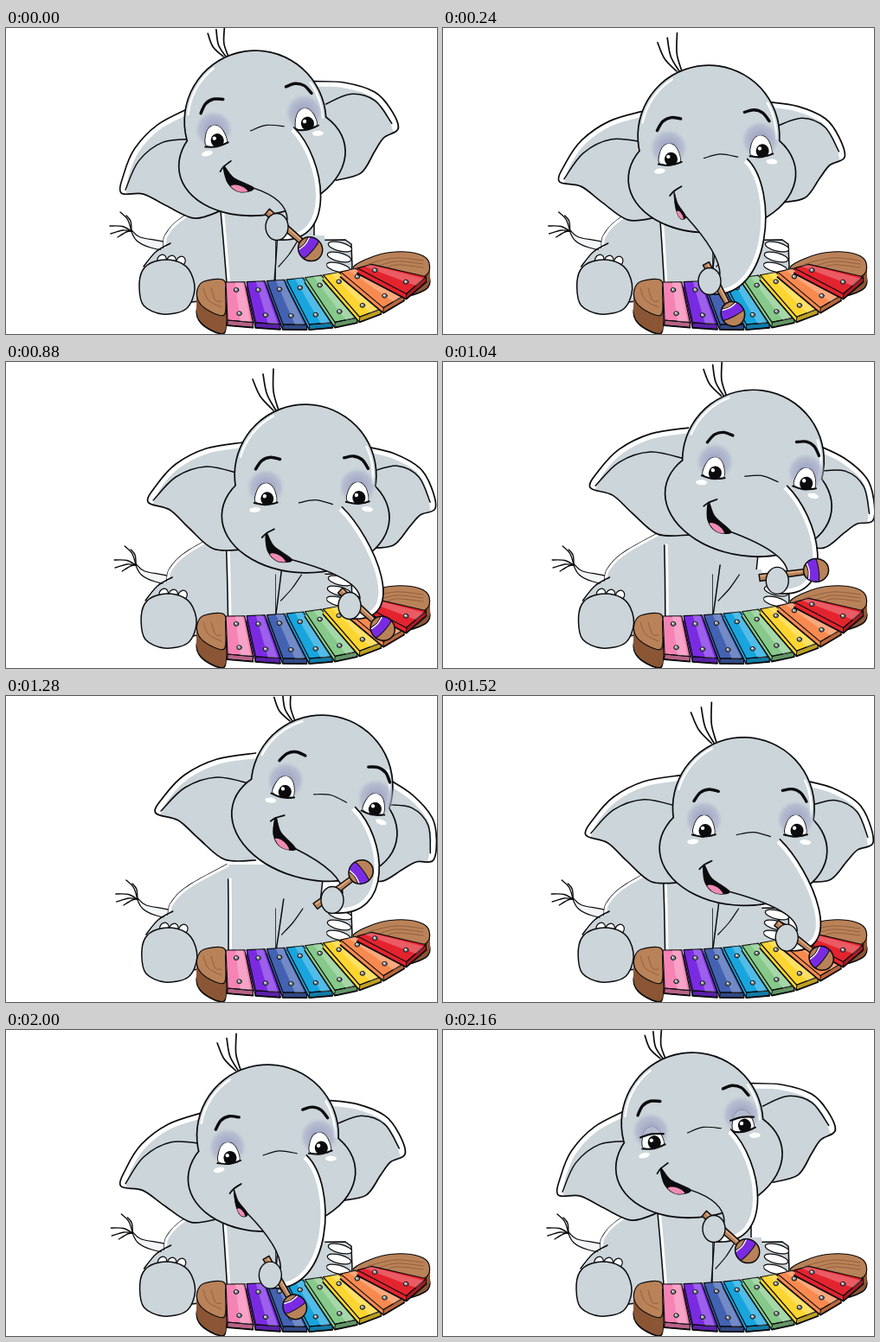
Recreate the animation shown at these times as an HTML page with a canvas. Size 498 px wide and 354 px high, loop 2.2 s.

```html
<!DOCTYPE html>
<html>
<head>
<meta charset="utf-8">
<title>Elephant playing a xylophone</title>
<style>
html, body { margin: 0; width: 100%; height: 100%; overflow: hidden; background: #fff; }
canvas { display: block; }
</style>
</head>
<body>
<canvas id="stage" width="498" height="354"></canvas>
<script>
const ctx = document.getElementById('stage').getContext('2d');
const INK = '#0b0b0d', SKIN = '#cbd5da', WOOD = '#b98258', DARK = '#8b5635';
const LOOP = 2200, STEP = 40, RAD = Math.PI / 180;

// Key poses from left to right: head centre, tilt, lift of the face,
// width of the smile, trunk tip and angle of the mallet.
const poses = [
  [288, 108, -9, 13, 1, 313, 230, 41],
  [307, 125, -3.5, 4, .4, 308, 293, 62],
  [334, 132, 0, 0, .9, 361, 290, 47],
  [346, 131, 1, 0, 1, 397, 282, 42],
  [365, 104, 12.5, 12, 1, 377, 236, -37]];

// When the swing reaches each pose.
const swing = [[0, 0], [80, 0], [240, 1], [560, 2], [880, 3], [1120, 3.9], [1200, 4],
  [1280, 4], [1540, 3], [1760, 2], [1960, 1], [2160, 0], [LOOP, 0]];

function swingAt(t) {
  const k = swing.findIndex(s => s[0] > t), [t0, a] = swing[k - 1], [t1, b] = swing[k];
  return a + (b - a) * (t - t0) / (t1 - t0);
}

// Smooth blend through the key poses.
function poseAt(u) {
  const k = Math.min(3, Math.floor(u)), f = u - k;
  const [p, a, b, q] = [-1, 0, 1, 2].map(i => poses[Math.max(0, Math.min(4, k + i))]);
  const [x, y, tilt, lift, smile, hx, hy, stick] = a.map((v, i) => v + f / 2 * (b[i] - p[i]
    + f * (2 * p[i] - 5 * v + 4 * b[i] - q[i] + f * (3 * (v - b[i]) + q[i] - p[i]))));
  return { u, x, y, tilt, lift, smile, hx, hy, stick };
}

// Smooth curve through flat x, y pairs.
function curve(a, closed) {
  const path = new Path2D(), n = a.length / 2;
  const pt = i => {
    i = closed ? (i + n) % n : Math.max(0, Math.min(n - 1, i));
    return [a[2 * i], a[2 * i + 1]];
  };
  path.moveTo(...pt(0));
  for (let i = 0; i < (closed ? n : n - 1); i++) {
    const [p, q, r, s] = [pt(i - 1), pt(i), pt(i + 1), pt(i + 2)];
    path.bezierCurveTo(q[0] + (r[0] - p[0]) / 6, q[1] + (r[1] - p[1]) / 6,
      r[0] - (s[0] - q[0]) / 6, r[1] - (s[1] - q[1]) / 6, r[0], r[1]);
  }
  if (closed) path.closePath();
  return path;
}
function poly(...a) {
  const p = new Path2D();
  for (let i = 0; i < a.length; i += 2) p.lineTo(a[i], a[i + 1]);
  p.closePath();
  return p;
}
function oval(x, y, rx, ry = rx, turn = 0) {
  const p = new Path2D();
  p.ellipse(x, y, rx, ry, turn, 0, 7);
  return p;
}
function stroke(path, width = 1.5, color = INK) {
  ctx.lineWidth = width;
  ctx.strokeStyle = color;
  ctx.stroke(path);
}
function fill(path, color, width = 1.5) {
  ctx.fillStyle = color;
  ctx.fill(path);
  if (width) stroke(path, width);
}
const line = (a, width, color) => stroke(curve(a), width, color);

function inside(path, draw) {
  ctx.save();
  ctx.clip(path);
  draw();
  ctx.restore();
}
function placed(x, y, degrees, draw) {
  ctx.save();
  ctx.translate(x, y);
  ctx.rotate(degrees * RAD);
  draw();
  ctx.restore();
}
// Solid block: the top face pulled down by its height.
function block(top, height, side, face) {
  for (let d = height; d >= 0; d--)
    placed(0, d, 0, () => fill(top, side, d === height ? 2 : 0));
  fill(top, face, 1.2);
}

function drawBody({ u }) {
  // The higher a point, the more it follows the swing.
  const lean = a => a.map((v, i) => i % 2 ? v : v + u * (320 - a[i + 1]) / 50);

  const [x, y, bx, by] = lean([145, 234, 184, 252]);
  fill(curve([x, y, x + 10, y + 8, bx, by - 4, bx + 8, by + 6, x + 22, y + 20, x + 6, y + 12], true), '#f3f6f7', 1.3);
  for (const [dx, dy] of [[-25, -5], [-24, 4], [-16, 8], [-13, -21], [-6, -17]])
    line([x, y + 1, x + dx * .5 + 2, y + dy * .5 - 2, x + dx, y + dy], 1.4);

  const side = lean([245, 195, 205, 218, 187, 235, 182, 255, 190, 320]);
  const torso = curve(side);
  torso.lineTo(356, 300);
  torso.lineTo(356 + u * 3, 195);
  fill(torso, SKIN);
  inside(torso, () => line(side, 6, '#fff'));

  fill(poly(312, 246, 392, 245, 399, 250, 400, 276, 396, 295, 312, 300), SKIN);
  for (let i = 0; i < 3; i++) fill(oval(386 - i, 253 + i * 12, 14, 5, .25), '#fff', 1.2);
  fill(poly(312, 240, 368, 240, 372, 300, 312, 300), SKIN, 0);

  const arm = lean([248, 212, 251, 245, 255, 295]);
  line(arm.map((v, i) => i % 2 ? v : v + 2.5), 3, '#fff');
  line(arm);
  line(lean([314, 235, 312, 266, 310, 295]));
  line(lean([337, 246, 327, 262, 315, 276]), 1.2);

  placed(u * .7, 0, 0, () => {
    fill(poly(192, 250, 172, 260, 160, 278, 164, 300, 205, 300), SKIN, 0);
    line([190, 249, 173, 259, 159, 276]);
    for (let i = 0; i < 3; i++) fill(oval(180 + i * 11, 268 + i, 5, 6, .5), '#fff', 1.2);
    fill(curve([154, 300, 158, 280, 172, 270, 194, 269, 211, 279, 218, 302, 208, 325, 181, 331, 159, 321], true), SKIN);
  });
}

function drawXylophone() {
  block(curve([402, 280, 420, 266, 450, 259, 478, 262, 489, 272, 484, 287, 450, 295], true), 16, DARK, WOOD);
  for (let i = 0; i < 3; i++) line([418 + i * 8, 273 + i * 4, 450, 266 + i * 4, 482, 269 + i * 4], .8, DARK);
  block(curve([221, 303, 229, 293, 252, 292, 254, 312, 252, 332, 236, 328, 223, 317], true), 21, DARK, WOOD);
  for (let i = 0; i < 2; i++) line([228 + i * 9, 301, 234 + i * 8, 315, 249, 323 - i * 7], .8, DARK);

  const colors = ['#f584b5', '#7a2be2', '#4362b2', '#18a5de', '#86c98a', '#fcd530', '#f88a50', '#e3242f'];
  colors.forEach((color, n) => {
    // A point of the bar: s across, f from the far end to the near end.
    const at = (s, f) => {
      const i = n + s * .9;
      const x0 = 254 + 24.5 * i - .4 * i * i, y0 = 294 - .33 * i * i;
      const x1 = 256 + 33 * i - .5 * i * i, y1 = 338 + 3 * i - .15 * i ** 3;
      return [x0 + (x1 - x0) * f, y0 + (y1 - y0) * f];
    };
    const face = (s0, s1) => poly(...at(s0, 0), ...at(s1, 0), ...at(s1, 1), ...at(s0, 1));
    const bar = face(0, 1);
    block(bar, 6, color, color);
    const [ax, ay] = at(0, 1), [bx, by] = at(1, 1);
    fill(poly(ax, ay, bx, by, bx, by + 6, ax, ay + 6), '#00000040', 1);
    fill(face(.5, .9), '#ffffff40', 0);
    for (const f of [.2, .8]) {
      const [x, y] = at(.5, f);
      fill(oval(x, y, 2.8, 2.4), '#8f989c', 1);
      fill(oval(x - .7, y - .8, .9), '#fff', 0);
    }
  });
}

function drawEar(pts, fold) {
  const ear = curve(pts);
  fill(ear, SKIN, 0);
  inside(ear, () => line(pts.slice(0, 10), 12, '#fff'));
  stroke(ear, 1.7);
  line(fold);
}

// The ear on the raised side droops, the other one follows the tilt.
function drawEars({ x, y, tilt }) {
  const back = Math.min(tilt, 0);
  placed(x, y, 2 * back, () => {
    ctx.scale(1 + tilt * .005, 1);
    drawEar([-72, -38, -114, -31, -149, -13, -171, 11, -181, 31, -156, 40, -134, 61, -106, 85, -72, 86],
      [-175, 29, -149, 2, -114, -10, -76, -2]);
  });
  placed(x, y, tilt > 0 ? tilt * 1.7 : tilt, () => {
    ctx.scale(1 - back * .008, 1);
    drawEar([70, -35, 102, -28, 132, -12, 146, 10, 151, 34, 134, 42, 122, 56, 104, 78, 76, 82],
      [78, -7, 106, -14, 131, -2, 145, 27]);
  });
}

function drawEye(x, y, side, lid) {
  placed(x, y, 0, () => {
    const glow = ctx.createRadialGradient(0, -8, 8, 0, -8, 23);
    glow.addColorStop(0, '#a6abc8');
    glow.addColorStop(.6, '#b1b7cdc0');
    glow.addColorStop(1, '#cbd5da00');
    fill(oval(0, -8, 23), glow, 0);
    const ball = curve([-12, 9, -11, -3, -5, -12, 4, -13, 11, -5, 13, 9, 2, 12], true);
    const edge = -13 + lid * 22;
    inside(ball, () => {
      fill(ball, '#fff', 1.6);
      fill(oval(2, 5, 7.5, 8), INK, 0);
      fill(oval(-1, 2, 2.2), '#fff', 0);
      fill(poly(-15, -16, 15, -16, 15, edge, -15, edge), '#b3b9ce', 0);
    });
    if (lid) line([-13, edge + 1, 0, edge - 1, 14, edge + 1], 2.2);
    line([-13, 10, 0, 12, 14, 9], 2);
    ctx.scale(side, 1);
    fill(oval(-12, 18, 6.5, 3, -.1), '#fff', 0);
    line([-12, -29, -5, -39, 5, -43, 16, -41], 3.4);
  });
}

function drawHead({ x, y, tilt, lift, smile }, lid) {
  for (let i = -1; i < 2; i++) {
    const rx = x - 34 + i * 3, ry = y - 75, size = 1 - lift * .02;
    const tx = rx + (-15 + i * 9) * size, ty = ry + (-42 - i * 6) * size;
    line([rx, ry, (rx + tx) / 2 - 3, (ry + ty) / 2 + 2, tx, ty], 1.7);
  }
  placed(x, y, tilt, () => {
    const head = oval(0, 0, 81);
    head.addPath(oval(1, 48 - lift * .3, 96, 64));
    stroke(head, 3.4);
    fill(head, SKIN, 0);
    const shine = new Path2D();
    shine.arc(0, 0, 78, 3.4, 4.2);
    shine.moveTo(70, -34);
    shine.arc(0, 0, 78, -.45, .1);
    stroke(shine, 2.5, '#fff');

    const turn = tilt * .3;
    drawEye(-46 + turn, 23 - lift, 1, lid);
    drawEye(60 + turn, 20 - lift, -1, lid);
    placed(0, -1.7 * lift, 0, () => {
      line([-7, 32, 12, 28.5, 32, 33], 1.2);
      ctx.translate(-44, 68);
      line([-5, 5, 0, 0, 9, -5], 1.8);
      ctx.scale(smile, 1);
      const open = curve([0, 0, 9, 15, 30, 30, 14, 32, 2, 20], true);
      fill(open, INK);
      inside(open, () => fill(oval(13, 30, 11, 5.5, .5), '#f08cb4', 0));
    });
  });
}

function drawTrunk({ x, y, tilt, lift, smile, hx, hy }) {
  const c = Math.cos(tilt * RAD), s = Math.sin(tilt * RAD);
  const face = (a, b) => [x + a * c - b * s, y + a * s + b * c];
  const [rx, ry] = face(43, 36 - 1.7 * lift);
  const lip = face(-44 + 30 * smile, 98 - 1.7 * lift);
  const front = [rx + 36, ry + 35, hx + 72, hy + 20, hx + 2, hy + 15];
  const under = [hx + 12, hy - 32, ...lip];

  const right = new Path2D(), left = new Path2D(), trunk = new Path2D();
  right.moveTo(rx, ry);
  right.bezierCurveTo(...front);
  left.moveTo(hx + 12, hy - 8);
  left.quadraticCurveTo(...under);
  trunk.moveTo(rx, ry);
  trunk.bezierCurveTo(...front);
  trunk.lineTo(hx + 12, hy - 8);
  trunk.quadraticCurveTo(...under);
  trunk.closePath();

  fill(trunk, SKIN, 0);
  inside(trunk, () => stroke(right, 11, '#fff'));
  stroke(right, 1.7);
  stroke(left);
}

function drawMallet({ hx, hy, stick }) {
  placed(hx, hy, stick, () => {
    fill(poly(-20, -10, 38, -9, 38, -3, -20, -2), WOOD, 1.4);
    line([-18, -7.5, 34, -7], 1.4, '#e2b28c');
    const ball = oval(46, -6, 14.5, 13.5);
    fill(ball, WOOD, 0);
    inside(ball, () => {
      fill(curve([34, -22, 37, -6, 34, 10, 46, 10, 49, -6, 46, -22], true), '#7a2be2', 1);
      line([35, -20, 38, -6, 35, 8], 1.4, '#fff');
    });
    stroke(ball);
  });
  fill(oval(hx, hy, 13, 15.5), SKIN, 1.4);
}

function frame(now) {
  const t = Math.floor(now % LOOP / STEP) * STEP, pose = poseAt(swingAt(t));
  ctx.fillStyle = '#fff';
  ctx.fillRect(0, 0, 498, 354);
  ctx.lineCap = ctx.lineJoin = 'round';
  drawBody(pose);
  drawXylophone();
  drawEars(pose);
  drawHead(pose, Math.max(0, .9 - Math.abs(t - 2120) / 80));
  drawTrunk(pose);
  drawMallet(pose);
}

const start = performance.now();
(function loop() {
  frame(performance.now() - start);
  requestAnimationFrame(loop);
})();
</script>
</body>
</html>
```
